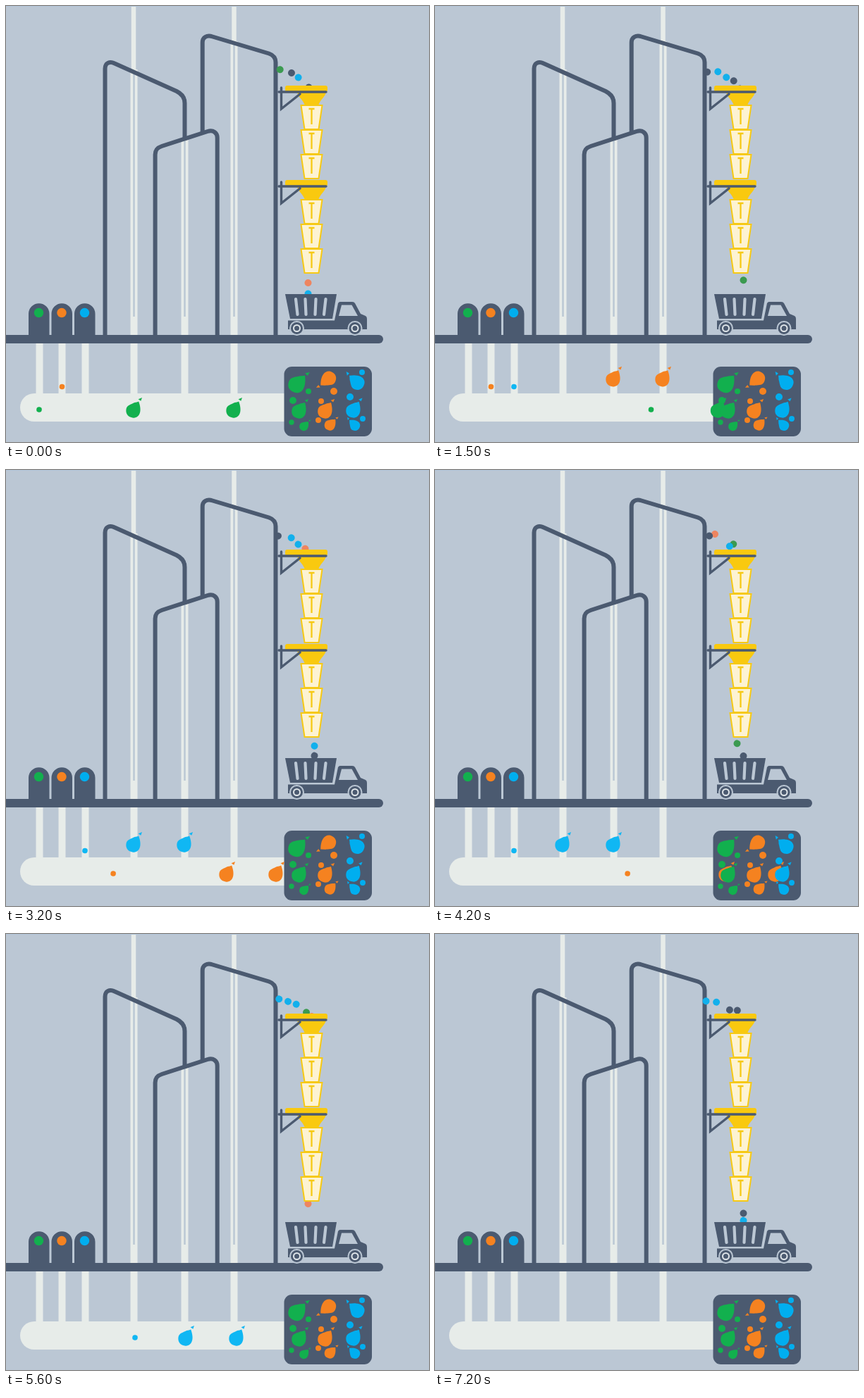
Recreate the animation shown at these times as an HTML page. Size 600 px wide and 619 px high, loop 7300 ms.

```html
<!DOCTYPE html>
<html lang="en">
<head>
<meta charset="utf-8">
<title>Waste sorting</title>
<style>
html, body { margin: 0; width: 100%; height: 100%; overflow: hidden; background: #bbc7d4; }
svg { display: block; width: 600px; height: 619px; }
.dark { fill: #4b5a70; }
.line { fill: none; stroke: #4b5a70; stroke-width: 6; stroke-linejoin: round; }
.pipe { fill: none; stroke: #e7ece9; stroke-width: 10; }
.gap { fill: none; stroke: #bbc7d4; stroke-width: 2.5; }
.arm { fill: none; stroke: #4b5a70; stroke-width: 3.4; stroke-linecap: round; }
.green { fill: #12b04e; }
.orange { fill: #f58220; }
.blue { fill: #00aeef; }
#movers .blue { fill: #10b7f3; }
</style>
</head>
<body>
<svg viewBox="0 0 600 619">
  <defs>
    <g id="bag">
      <path d="M5.500-12.500C9-6 10-1 9.500 3C9 8 5 12 0 11.500C-7 11.500-10.500 7-10.500 1C-10.500-5-4-7 0-10Q3-11 5.500-12.500Z"/>
      <path d="M4.500-15.500L9.500-18.500L8.500-13.500Z"/>
    </g>
    <g id="cup">
      <path d="M418.500 1H448.500L443.500 35H423.500Z" fill="#fdf3d2" stroke="#f6c915" stroke-width="2"/>
      <path d="M429.500 6H437.500M433.500 6V28" fill="none" stroke="#f6c915" stroke-width="2.300"/>
    </g>
    <g id="chute">
      <path d="M413 122H454C453 129 447 131 443 141H424C420 131 414 129 413 122Z" fill="#f9c90f"/>
      <rect x="396" y="113" width="60" height="9" rx="3" fill="#f9c90f"/>
      <path class="arm" d="M387 122H454M390.500 116V146L417 125"/>
      <use href="#cup" y="140"/><use href="#cup" y="175"/><use href="#cup" y="210"/>
    </g>
    <g id="bin">
      <path class="dark" d="M32 468V437A14.700 14.700 0 0 1 61.500 437V468Z"/>
      <circle cx="46.500" cy="435.500" r="6.700"/>
    </g>
    <g id="wheel">
      <circle cx="412.500" cy="457.500" r="10.500" fill="#bbc7d4"/>
      <circle cx="412.500" cy="457.500" r="8.500"/>
      <circle cx="412.500" cy="457.500" r="4.500" fill="none" stroke="#dfe5e9" stroke-width="2"/>
    </g>
  </defs>

  <rect width="600" height="619" fill="#bbc7d4"/>
  <rect width="600" height="1" fill="#b2c6da"/>

  <path class="pipe" d="M181 1V90M323.500 1V54" style="stroke-width:6.500"/>
  <path class="pipe" d="M181.500 90V441M253.500 188V441M323.500 50V441"/>
  <path class="gap" d="M181.500 96V441M253.500 188V441M323.500 54V441"/>
  <path class="pipe" d="M181.500 441V552M253.500 441V552M323.500 441V552M47.500 478V552M79.500 478V552M112.500 478V552"/>
  <path d="M395 550H40A20 20 0 0 0 40 590H395Z" fill="#e7ece9"/>

  <path class="line" d="M140.500 468V89C140.500 81 147 78 154 81.500L242 121C250 125 253.500 130 253.500 138V187"/>
  <path class="line" d="M278.700 179V52C278.700 44 285 41 293 43.500L373 67.500C380 70 382.500 74 382.500 80V468"/>
  <path class="line" d="M211.600 468V211C211.600 204 215 201 221 199L286 178C294 175.500 299.700 180 299.700 187V468"/>

  <path class="dark" d="M0 467H529A5.500 5.500 0 0 1 529 479H0Z"/>
  <use href="#bin" class="green"/>
  <use href="#bin" class="orange" x="32.500"/>
  <use href="#bin" class="blue" x="65"/>

  <g id="balls"></g>
  <use href="#chute"/>
  <use href="#chute" y="134"/>

  <g class="dark">
    <path d="M396 409H469L463 444H403Z"/>
    <path d="M400 446.500H466L471 422Q472 420 474 420H491Q494 420 495 422L503 437L510 440Q512 441 512 444V459H400Z"/>
    <path d="M476 424.500H490.500L499 440H472Z" fill="#bbc7d4"/>
    <path d="M411 416L413.500 438M424.500 416L425.500 438M439.500 416L438.500 438M453.500 416L451 438" fill="none" stroke="#bbc7d4" stroke-width="4.200" stroke-linecap="round"/>
    <use href="#wheel"/>
    <use href="#wheel" x="82.500"/>
  </g>

  <rect class="dark" x="394.500" y="512" width="124.500" height="99" rx="11"/>
  <g id="movers"></g>
  <g class="green">
    <use href="#bag" transform="translate(413 536) rotate(21) scale(1.150)"/>
    <use href="#bag" transform="translate(416 574) rotate(12)"/>
    <use href="#bag" transform="translate(423 596) rotate(21) scale(.620)"/>
    <circle cx="429" cy="547" r="4"/><circle cx="407" cy="560" r="5"/><circle cx="405" cy="591" r="3.700"/>
  </g>
  <g class="orange">
    <use href="#bag" transform="translate(457 530) rotate(208)"/>
    <use href="#bag" transform="translate(453 574) rotate(12)"/>
    <use href="#bag" transform="translate(460 594) rotate(21) scale(.750)"/>
    <circle cx="465" cy="547" r="5"/><circle cx="447" cy="561" r="4"/><circle cx="443" cy="588" r="4"/>
  </g>
  <g class="blue">
    <use href="#bag" transform="translate(497 534) rotate(-71)"/>
    <use href="#bag" transform="translate(493 573) rotate(10)"/>
    <use href="#bag" transform="translate(494 595) rotate(-69) scale(.720)"/>
    <circle cx="505" cy="520" r="4"/><circle cx="488" cy="555" r="5"/><circle cx="506" cy="586" r="4"/>
  </g>
</svg>
<script>
const LOOP = 7300, STEP = 100;
const movers = [];
const ramp = (a, b, p) => a + (b - a) * Math.min(1, Math.max(0, p));

// A mover is an element plus a function of time giving [x, y], or null when hidden.
function addMover(layer, tag, attrs, at) {
  const el = document.createElementNS('http://www.w3.org/2000/svg', tag);
  for (const k in attrs) el.setAttribute(k, attrs[k]);
  document.getElementById(layer).append(el);
  movers.push({ el, at });
}

// Sink down a shaft, rest, drop into the main pipe, then run to the tank.
function route({ x, enter, sink, from, rest, run, speed, end }) {
  const drop = 460;
  return t => {
    const px = x + speed * Math.max(0, t - run);
    if (t < enter || px > end) return null;
    const py = t < run - drop
      ? ramp(from, rest, (t - enter) / sink)
      : ramp(rest, 573, (t - run + drop) / drop);
    return [px, py];
  };
}

const batches = [
  { color: 'green', shafts: [181, 323], bin: 47, enter: -2000, run: 0, speed: .147, dotSpeed: .173 },
  { color: 'orange', shafts: [253, 323], bin: 79.5, enter: 720, run: 2600, speed: .1, dotSpeed: .121 },
  { color: 'blue', shafts: [181, 253], bin: 112, enter: 1925, run: 5100, speed: .148, dotSpeed: .142 }
];
for (const { color, shafts, bin, enter, run, speed, dotSpeed } of batches) {
  for (const x of shafts)
    addMover('movers', 'use', { href: '#bag', class: color, rotate: 8 },
      route({ x, enter, sink: 800, from: 441, rest: 531, run, speed, end: 488 }));
  addMover('movers', 'circle', { r: 3.8, class: color },
    route({ x: bin, enter: enter - 1220, sink: 500, from: 485, rest: 540.5, run, speed: dotSpeed, end: 416 }));
}

// Rubble arcs out of the wall into the chute and falls out below into the truck.
const TRANSIT = 1500;
let seed = 11;
const random = () => (seed = seed * 16807 % 2147483647) / 2147483647;
const tints = ['#4b5a70', '#12b0ec', '#4b5a70', '#12b0ec', '#ee8560', '#3b9a50'];

for (let start = -2200; start < LOOP; start += 100) {
  const launch = start + 80 * random();
  const fill = tints[Math.floor(random() * tints.length)];
  const top = 89 + 8 * random();
  const exitX = random() < .3 ? 428.5 : 437.5;
  addMover('balls', 'circle', { r: 5, fill }, t => {
    const d = (t - launch) * .12;
    if (d >= 0 && d < 52) return [382 + d, top + .0088 * d * d];
    const fall = (t - launch - TRANSIT) * .2;
    return fall >= 0 && fall < 36 ? [exitX, 378 + fall] : null;
  });
}

const began = performance.now();
function draw() {
  const t = Math.floor((performance.now() - began) % LOOP / STEP) * STEP;
  for (const { el, at } of movers) {
    const pos = at(t);
    el.style.display = pos ? '' : 'none';
    if (pos) el.setAttribute('transform', `translate(${pos}) rotate(8)`);
  }
  requestAnimationFrame(draw);
}
draw();
</script>
</body>
</html>
```
